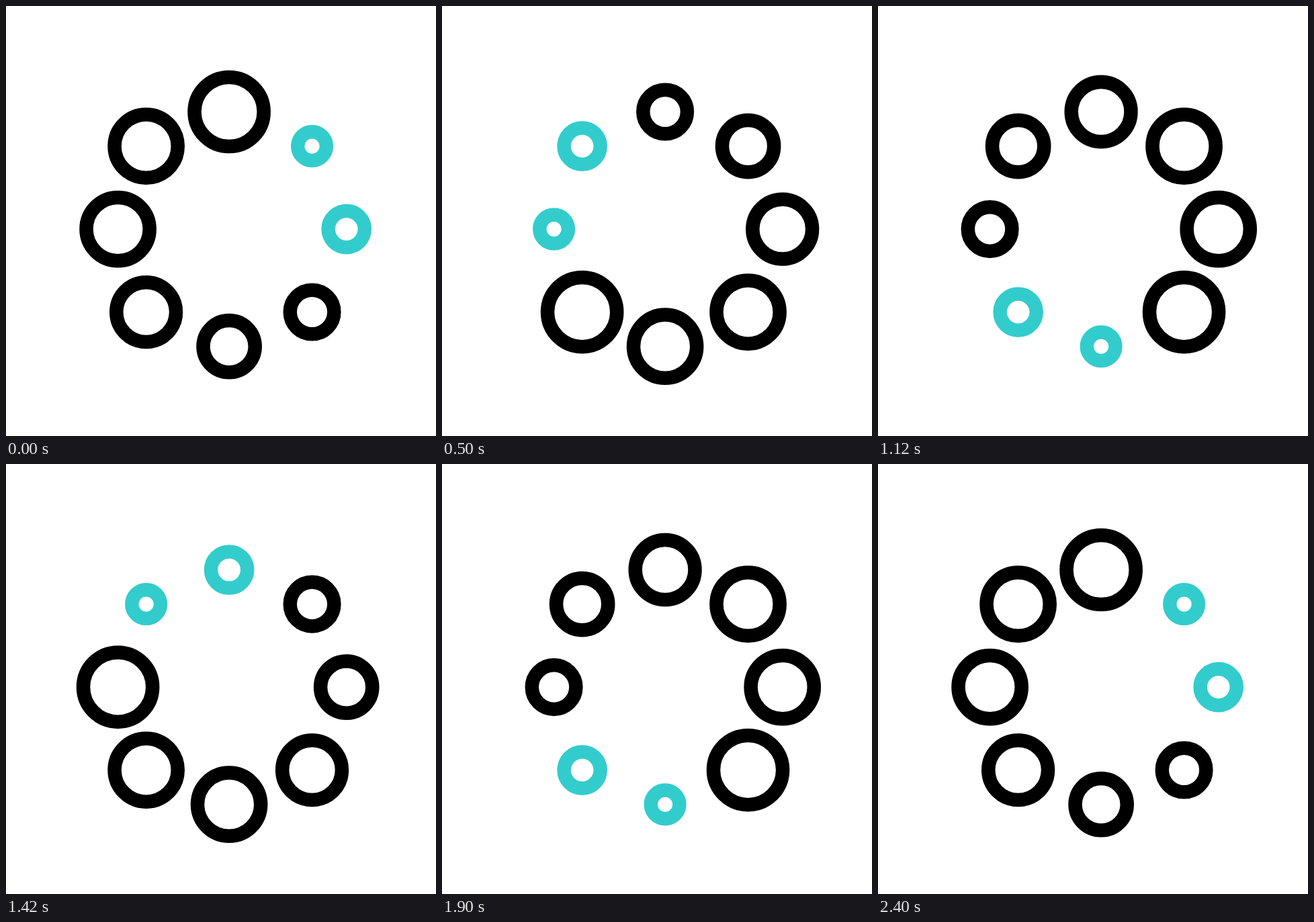
Write an HTML page that moves like this. It is 640x640 px and loops after 2.42 s.

```html
<!DOCTYPE html>
<html lang="en">
<head>
<meta charset="utf-8">
<title>Ring spinner</title>
<style>
  html, body { margin: 0; width: 100%; height: 100%; overflow: hidden; background: #fff; }
  svg { display: block; width: 100%; height: 100%; }
  circle { fill: none; stroke-width: 20.5; }
</style>
</head>
<body>
<svg id="stage" viewBox="0 0 640 640"></svg>
<script>
const LOOP = 2420;
const STEP = 100;
const COUNT = 8;
const CENTER = 332.1;
const ORBIT = 174.6;
// Radii in clockwise order, starting at the smallest ring
const RADII = [21.3, 27.1, 32.8, 38.6, 44.4, 47.1, 47.1, 51.6];

const stage = document.getElementById("stage");

function makeRing(index) {
  const angle = index * 2 * Math.PI / COUNT;
  const ring = document.createElementNS("http://www.w3.org/2000/svg", "circle");
  // The leftmost ring sits slightly inside the orbit
  const orbit = index === 6 ? 165.5 : ORBIT;
  ring.setAttribute("cx", CENTER + orbit * Math.sin(angle));
  ring.setAttribute("cy", CENTER - orbit * Math.cos(angle));
  stage.append(ring);
  return ring;
}

const rings = Array.from({ length: COUNT }, (_, index) => makeRing(index));

function draw(time) {
  const head = 1 + Math.floor((time % LOOP) / STEP);
  rings.forEach((ring, index) => {
    const offset = (index - head % COUNT + COUNT) % COUNT;
    ring.setAttribute("r", RADII[offset]);
    ring.setAttribute("stroke", offset < 2 ? "#33cccc" : "#000");
  });
}

const start = performance.now();
function tick() {
  draw(performance.now() - start);
  requestAnimationFrame(tick);
}
tick();
</script>
</body>
</html>
```
